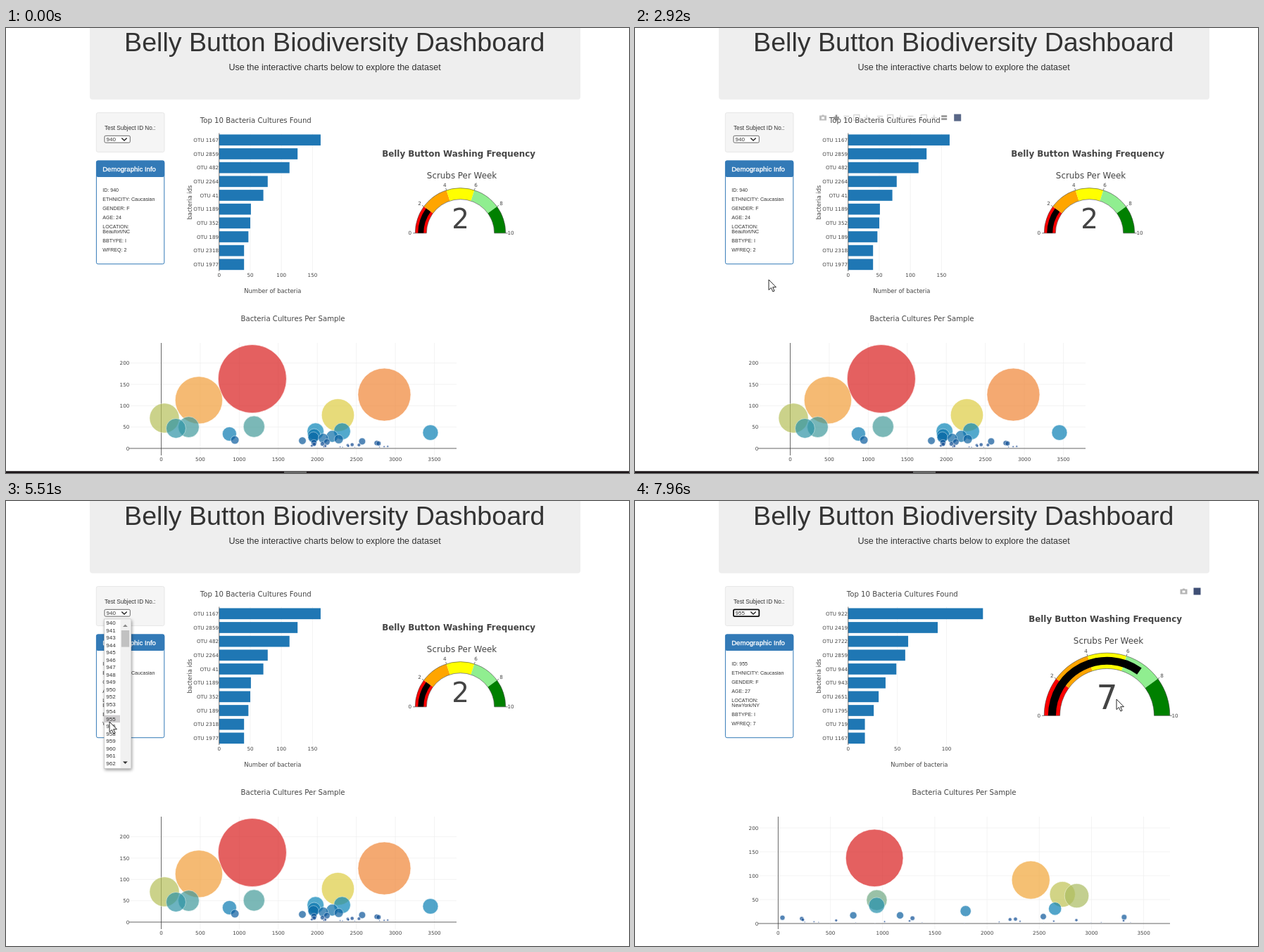
Write an HTML page that moves like this. It is 885x633 px and loops after 8 s.

```html
<!DOCTYPE html>
<html lang="en">
<head>
<meta charset="utf-8">
<title>Belly Button Biodiversity Dashboard</title>
<style>
  html, body { margin: 0; width: 100%; height: 100%; overflow: hidden; background: #fff; }
  svg { display: block; width: 885px; height: 633px; }
  text { font-family: "Liberation Sans", Arial, sans-serif; fill: #333; white-space: pre; }
  .plot text { font-family: "DejaVu Sans", Verdana, sans-serif; fill: #444; }
  .light text { font-family: "Liberation Sans", Arial, sans-serif; fill: #fff; stroke: #fff; stroke-width: .3; }
</style>
</head>
<body>
<svg id="stage" viewBox="0 0 885 633"></svg>
<script>
const LOOP = 8000;
const BLUE = '#1f77b4';

// `top` holds the ten largest cultures as id: count, `next` the ids that follow.
// `grow` is the extra width of the charts, `spread` the id range of the small cultures.
const samples = [
  {
    id: 940, age: 24, place: 'Beaufort/NC', wash: 2, grow: 0,
    axes: { x0: 220.5, kx: .11086, y0: 598, ky: .607 },
    top: [[1167, 163], [2859, 126], [482, 113], [2264, 78], [41, 71],
      [1189, 51], [352, 50], [189, 47], [2318, 40], [1977, 40]],
    next: [3450, 874, 1959, 2191, 1950, 2077, 2275, 944], largestNext: 37, spread: [1800, 3000]
  },
  {
    id: 955, age: 27, place: 'NewYork/NY', wash: 7, grow: 50,
    axes: { x0: 203.4, kx: .14834, y0: 600, ky: .68 },
    top: [[922, 137], [2419, 91], [2722, 61], [2859, 58], [944, 49],
      [943, 38], [2651, 31], [1795, 26], [719, 17], [1167, 17]],
    next: [2539, 3313, 41, 1286], largestNext: 14.5, spread: [200, 3550]
  }
];

const range = n => [...Array(n).keys()];
const clamp = v => Math.max(0, Math.min(1, v));
const text = (x, y, s, size, anchor = 'start', more = '') =>
  `<text x="${x}" y="${y}" font-size="${size}" text-anchor="${anchor}" ${more}>${s}</text>`;
const rect = (x, y, w, h, fill, more = '') =>
  `<rect x="${x}" y="${y}" width="${w}" height="${h}" fill="${fill}" ${more}/>`;
const line = (x1, y1, x2, y2, color, width = .7) =>
  `<path d="M${x1} ${y1}L${x2} ${y2}" stroke="${color}" stroke-width="${width}"/>`;
const group = (id, body, more = '') => `<g id="${id}" ${more}>${body}</g>`;

function randomFrom(seed) {
  return () => (seed = (seed * 16807) % 2147483647) / 2147483647;
}

// Counts fall off exponentially after the ten largest cultures.
function cultures({ id, top, next, largestNext, spread: [low, high] }) {
  const random = randomFrom(id);
  const rest = range(30).map(i =>
    [next[i] ?? low + (high - low) * random(), largestNext * Math.exp(-.09 * i)]);
  return [...top, ...rest];
}

function heatColor(v) {
  const stops = [[12, 51, 131], [10, 136, 186], [242, 211, 56], [242, 143, 56], [217, 30, 30]];
  const i = Math.min(3, Math.floor(v * 4)), f = v * 4 - i;
  return `rgb(${stops[i].map((c, k) => Math.round(c + (stops[i + 1][k] - c) * f))})`;
}

function barChart({ top, grow }) {
  const x0 = 302.8, width = 152.2 + grow, max = top[0][1], scale = .947 * width / max;
  const rows = top.map(([id, n], i) => {
    const y = 159.3 + 19.67 * i;
    return rect(x0, y - 7.85, n * scale, 15.7, BLUE) + text(302, y + 2.6, `OTU ${id}`, 7.15, 'end');
  });
  const columns = range(Math.ceil(max / 50)).map(i => {
    const x = x0 + i * 50 * scale;
    return line(x, 149.5, x, 346, '#eee') + text(x, 354.2, i * 50, 7.2, 'middle');
  });
  return columns.join('') + rows.join('') + line(x0, 149.5, x0, 346, '#444') +
    text(354.8 + grow / 2, 135.2, 'Top 10 Bacteria Cultures Found', 10.15, 'middle') +
    text(x0 + width / 2, 377.2, 'Number of bacteria', 8.35, 'middle') +
    text(0, 0, 'bacteria ids', 8.35, 'middle', 'transform="translate(264 248) rotate(-90)"');
}

function gaugeChart({ wash, grow }) {
  const r = 64.3 + grow / 2, x = 581.2 + r, y = 259.7 + r / 2;
  const at = (v, rad) => {
    const a = Math.PI * (1 - v / 10);
    return [x + rad * Math.cos(a), y - rad * Math.sin(a)];
  };
  const ring = (a, b, inner, outer, fill, more = '') =>
    `<path d="M${at(a, outer)}A${outer} ${outer} 0 0 1 ${at(b, outer)}L${at(b, inner)}A${inner} ${inner} 0 0 0 ${at(a, inner)}Z" fill="${fill}" ${more}/>`;
  const labels = range(6).map(i => {
    const [lx, ly] = at(i * 2, r + 7.3);
    return line(...at(i * 2, r), ...at(i * 2, r + 3), '#444') + text(lx, ly + 2.6, i * 2, 7.2, 'middle');
  });
  return ['red', 'orange', 'yellow', 'lightgreen', 'green']
    .map((c, i) => ring(i * 2, i * 2 + 2, r * .75, r, c)).join('') +
    ring(0, wash, r * .8125, r * .9375, '#000') +
    ring(0, 10, r * .75, r, 'none', 'stroke="#444" stroke-width=".6"') + labels.join('') +
    text(x, y - r * .1, wash, 17 + r * .34, 'middle') +
    text(x - 2.4, y - r - 44.5, 'Belly Button Washing Frequency', 11.9, 'middle', 'font-weight="bold"') +
    text(x + 2, y - r - 13.2, 'Scrubs Per Week', 11.9, 'middle');
}

function bubbleChart(sample) {
  const { axes: { x0, kx, y0, ky }, grow } = sample;
  const right = 640 + grow * 2.4, max = sample.top[0][1];
  const columns = range(8).map(i => {
    const x = x0 + i * 500 * kx;
    return line(x, 448, x, 608, '#eee') + text(x, 616.2, i * 500, 7.2, 'middle');
  });
  const rows = range(5).map(i => {
    const y = y0 - i * 50 * ky;
    return line(176, y, right, y, '#eee') + text(175.3, y + 2.6, i * 50, 7.2, 'end');
  });
  const bubbles = cultures(sample).map(([id, n]) =>
    `<circle cx="${x0 + id * kx}" cy="${y0 - n * ky}" r="${n * .298}" fill="${heatColor(n / max)}" stroke="#fff" stroke-width=".6" opacity=".7"/>`);
  return columns.join('') + rows.join('') + line(x0, 448, x0, 608, '#444', .8) +
    line(175, y0, right, y0, '#444', .8) + bubbles.join('') +
    text((175 + right) / 2, 417.2, 'Bacteria Cultures Per Sample', 10.15, 'middle');
}

function demographics({ id, age, place, wash }) {
  let y = 232.6;
  return [`ID: ${id}`, 'ETHNICITY: Caucasian', 'GENDER: F', `AGE: ${age}`, 'LOCATION:', place, 'BBTYPE: I', `WFREQ: ${wash}`]
    .map(s => {
      const row = text(137.3, y, s, 7.05);
      y += s === 'LOCATION:' ? 7 : 13.1;
      return row;
    }).join('');
}

// Chart toolbars, drawn with the first icon centred on the origin.
const camera = '<path fill-rule="evenodd" d="M-5-3H-2L-1-4H1L2-3H5V4H-5ZM-2-1V2H2V-1Z" fill="#444" opacity=".4"/>';
const badge = x => rect(x - 5, -5, 10, 10, '#3f4f75');
const icons = ['M-4-4H4V4H-4Z', 'M-4 0H4M0-4V4', 'M-4-2H4M-4 2H4'];
function toolbar() {
  const breaks = [1, 5, 9, 12];
  const iconX = i => 14.4 * i + 4.6 * breaks.filter(b => b <= i).length;
  const tools = range(11).map(i => {
    const active = i === 0 || i === 10;
    return `<path transform="translate(${iconX(i + 1)} 0)" d="${icons[(i + 1) % 3]}" fill="none" stroke="#444" stroke-width="${active ? 2.6 : 1.3}" opacity="${active ? .7 : .25}"/>`;
  });
  return camera + tools.join('') + badge(iconX(12));
}

const page = rect(119, -9, 697, 110.7, '#eee', 'rx="4"') +
  text(466.8, 32.5, 'Belly Button Biodiversity Dashboard', 37.6, 'middle') +
  text(467, 60, 'Use the interactive charts below to explore the dataset', 12.53, 'middle') +
  rect(128.3, 120.5, 96.7, 56, '#f5f5f5', 'rx="2.4" stroke="#e3e3e3" stroke-width=".8"') +
  text(140, 144.8, 'Test Subject ID No.:', 8.2) +
  rect(140, 153.3, 36.3, 9.8, '#fff', 'id="select" rx="1.6"') +
  text(142.5, 161.1, '', 8, 'start', 'id="chosen"') +
  '<path d="M164.3 156.6L168 160.1L171.7 156.6" fill="none" stroke="#222" stroke-width="1.4"/>' +
  rect(128.4, 189, 96.4, 146.7, '#fff', 'rx="2.4" stroke="#337ab7"') +
  rect(128, 188.6, 97.2, 23.3, '#337ab7', 'rx="2.4"') +
  group('heading', text(137.2, 203.8, 'Demographic Info', 9.6), 'class="light"') +
  samples.map((s, i) => group('sample' + i, demographics(s) +
    `<g class="plot">${barChart(s)}${gaugeChart(s)}${bubbleChart(s)}</g>`)).join('') +
  group('barTools', toolbar()) + group('gaugeTools', camera + badge(19)) +
  group('bubbleTools', toolbar(), 'transform="translate(489 397)"') +
  group('tip', rect(244.3, 286.2, 253.7, 21.6, BLUE) +
    text(371, 295, '26', 7.8, 'middle') +
    text(371, 304.5, 'Bacteria;Firmicutes;Bacilli;Bacillales;Staphylococcaceae;Staphylococcus', 7.77, 'middle'), 'class="light"');

const ROW = 10.52;
const options = range(23).map(i => 940 + i).filter(n => ![942, 951, 957].includes(n));
const dropdown = rect(139.6, 168, 38, 212.5, '#fff', 'stroke="#bbb" stroke-width=".6" style="filter:drop-shadow(1px 2px 2px #0006)"') +
  rect(140, 0, 22, ROW, '#cfcdcf', 'id="highlight"') +
  options.map((n, i) => text(142.3, 176 + ROW * i, n, 8)).join('') +
  rect(162.5, 168.5, 14.8, 211.5, '#f1f1f1') + rect(163.8, 184, 11.4, 23.6, '#c1c1c1') +
  '<path d="M166 179L169.4 175.4L172.8 179Z" fill="#888"/><path d="M166 370.4L169.4 374L172.8 370.4Z" fill="#333"/>';

const stage = document.getElementById('stage');
stage.innerHTML = rect(0, 0, 885, 633, '#fff') + group('page', page) +
  group('taskbar', rect(0, 630.3, 885, 3, '#1b1518') + rect(395, 630.3, 32, 3, '#666')) +
  group('dropdown', dropdown) +
  '<circle id="click" r="10.7" fill="#fff04a" style="mix-blend-mode:multiply"/>' +
  '<path id="arrow" d="M0 0V14.6L3.4 11.5L5.9 17L8.1 16L5.7 10.7H10.4Z" fill="#fff" stroke="#111" stroke-width=".9"/>' +
  '<path id="cross" d="M-11 0H11M0-11V11" stroke="#fff" stroke-width="1.6" style="mix-blend-mode:difference"/>' +
  '<path id="beam" d="M-3-8H3M0-8V8M-3 8H3" stroke="#222" fill="none"/>';

const $ = id => document.getElementById(id);
const show = (id, on) => $(id).setAttribute('visibility', on ? 'visible' : 'hidden');
const move = (id, x, y) => $(id).setAttribute('transform', `translate(${x} ${y})`);
const fade = (t, start, end) => clamp((t - start) / 300) * (1 - clamp((t - end) / 300));

// Pointer strokes: start and end time, then the points passed at even intervals.
const strokes = [
  [430, 1200, [745, 608], [833, 555]],
  [1950, 2650, [657, 310], [393, 198]],
  [2650, 2920, [393, 198], [257, 349], [190, 358]],
  [2920, 3560, [190, 358], [162, 154]],
  [4810, 5510, [162, 154], [147, 314]],
  [6840, 7260, [147, 314], [347, 286]],
  [7260, 7960, [347, 286], [684, 282]]
];

function pointerAt(t) {
  const [start, end, ...points] = strokes.findLast(s => s[0] <= t) ?? strokes[0];
  const step = Math.floor((t - start) / 70) * 70;
  const along = clamp(step / (end - start)) * (points.length - 1);
  const i = Math.min(points.length - 2, Math.floor(along));
  return points[i].map((v, k) => v + (points[i + 1][k] - v) * (along - i));
}

function draw(t) {
  const [x, y] = pointerAt(t);
  const updated = t >= 6450, picked = t >= 6110, open = t >= 4360 && !picked;
  const grow = samples[+updated].grow;

  move('page', 0, t >= 4090 ? 1 : 0);
  show('taskbar', t < 4090);
  show('sample0', !updated);
  show('sample1', updated);
  $('chosen').textContent = picked ? 955 : 940;
  $('select').setAttribute('stroke', picked ? '#101010' : '#555');
  $('select').setAttribute('stroke-width', picked ? 1.8 : .9);

  show('dropdown', open);
  const row = Math.round(clamp((y - 173) / ROW / 19) * 19);
  $('highlight').setAttribute('y', 167.9 + row * ROW);

  move('barTools', 267 + grow, 127.5);
  move('gaugeTools', 729.5 + grow, 127.5);
  $('barTools').setAttribute('opacity', updated ? fade(t, 7160, 7540) : fade(t, 2370, 2880));
  $('gaugeTools').setAttribute('opacity', updated ? fade(t, 7540, LOOP) : fade(t, 1950, 2300));
  $('bubbleTools').setAttribute('opacity', fade(t, 430, 1130));
  show('tip', t >= 7190 && t < 7400);

  show('click', (t >= 4160 && t < 4360) || (t >= 5910 && t < 6110));
  move('click', x, y);

  const visible = (t >= 430 && t < 1270) || t >= 1950;
  const beam = t >= 6180 && t < 6850;
  const cross = x > 303 && x < 455 + grow && y > 150 && y < 346;
  show('arrow', visible && !beam && !cross);
  show('cross', visible && cross);
  show('beam', beam);
  move('arrow', x, y);
  move('cross', x, y);
  move('beam', x + 3, y + 1);
}

function tick() {
  draw(performance.now() % LOOP);
  requestAnimationFrame(tick);
}
tick();
</script>
</body>
</html>
```
